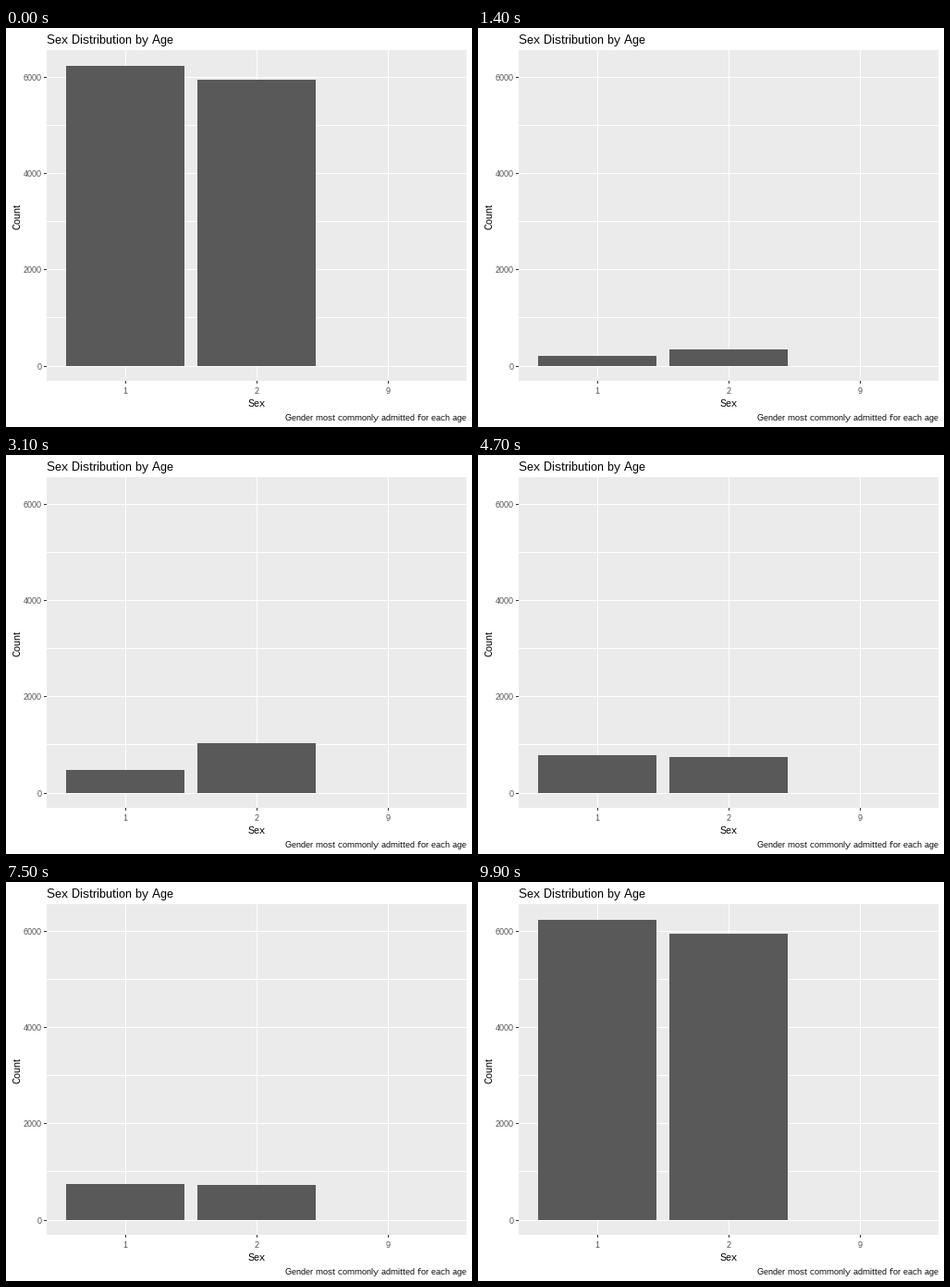
A matplotlib script that plays this animation: 504x432 px, repeating every 10000 ms.

```python
import math

import matplotlib.pyplot as plt
import numpy as np
from matplotlib.animation import FuncAnimation
from matplotlib.patches import Rectangle

W, H, DPI = 504, 432, 72
LEFT, TOP, RIGHT, BOTTOM = 44, 24, 498, 382
FIRST, STEP, BAR = 129, 142, 128

# admissions at a few ages; counts in between follow straight lines
AGES = [0, 1, 3, 14, 28, 31, 47, 59, 63, 72, 83, 87, 95]
COUNTS = {
    "1": [6230, 210, 75, 210, 380, 480, 785, 1160, 997, 900, 345, 96, 0],
    "2": [5940, 200, 95, 345, 1208, 1035, 745, 880, 940, 745, 690, 230, 0],
}

plt.rcParams.update({
    "font.family": "Liberation Sans",
    "text.hinting": "native",
    "text.hinting_factor": 1,
})
fig = plt.figure(figsize=(W / DPI, H / DPI), dpi=DPI, facecolor="white")
ax = fig.add_axes([0, 0, 1, 1])
ax.set_xlim(0, W)
ax.set_ylim(H, 0)
ax.axis("off")


def row(count):
    """Pixel row of a count on the vertical axis."""
    return math.floor(366.1 - count * 313 / 6000)


def box(x, y, w, h, color):
    return ax.add_patch(Rectangle((x, y), w, h, facecolor=color,
                                  linewidth=0, antialiased=False))


def label(x, y, text, size, color="black", ha="center", rotation=0):
    ax.text(x, y, text, fontsize=size, color=color, ha=ha, va="baseline",
            rotation=rotation, rotation_mode="anchor")


box(LEFT, TOP, RIGHT - LEFT, BOTTOM - TOP, "#EBEBEB")

for count in range(0, 6001, 1000):
    y = row(count)
    box(LEFT, y, RIGHT - LEFT, 1, "white")
    if count % 2000 == 0:
        box(LEFT - 3, y, 3, 1, "#333333")
        label(39, y + 4, str(count), 9, "#4D4D4D", "right")

for i, name in enumerate("129"):
    x = FIRST + i * STEP
    box(x, TOP, 1, BOTTOM - TOP, "white")
    box(x, BOTTOM, 1, 3, "#333333")
    label(x, 396, name, 9, "#4D4D4D")

label(LEFT, 17, "Sex Distribution by Age", 13, ha="left")
label(271, 410, "Sex", 11)
label(16, 204, "Count", 11, rotation=90)
label(RIGHT, 425, "Gender most commonly admitted for each age", 9, ha="right")

bars = [box(FIRST + i * STEP - BAR // 2, row(0), BAR, 0, "#595959")
        for i in range(len(COUNTS))]


def draw(frame):
    age = frame % 99  # the last frame is back at age 0
    for bar, counts in zip(bars, COUNTS.values()):
        top = row(np.interp(age, AGES, counts))
        bar.set_y(top)
        bar.set_height(row(0) - top)
    return bars


anim = FuncAnimation(fig, draw, frames=100, interval=100, repeat=True,
                     repeat_delay=0, blit=False)
plt.show()
```
